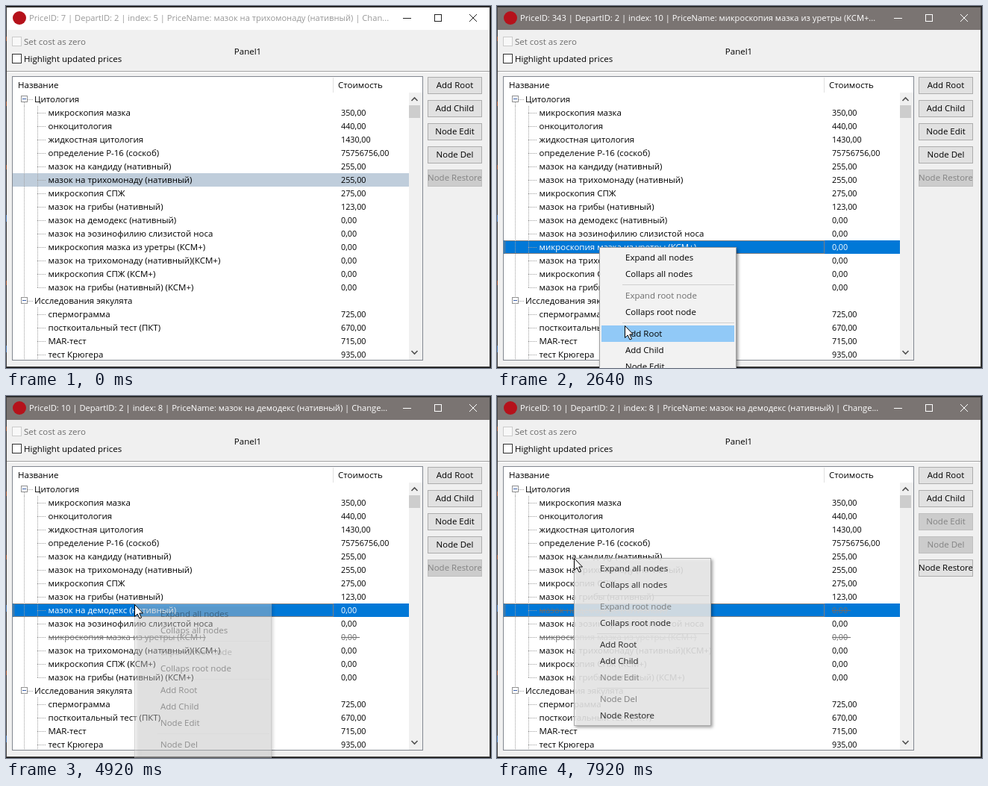
Write an HTML page with a canvas that moves like this. It is 650 by 485 pixels and loops after 8 s.

```html
<!DOCTYPE html>
<html lang="ru">
<head>
<meta charset="utf-8">
<title>Price tree</title>
<style>
html, body { margin: 0; width: 100%; height: 100%; overflow: hidden; background: #1e1e1e; }
canvas { display: block; }
</style>
</head>
<body>
<canvas id="stage" width="650" height="485"></canvas>
<script>
const ctx = document.getElementById('stage').getContext('2d');
const LOOP = 8000, STEP = 40, ROW = 18, TOP = 116;
const BLACK = '#000', GRAY = '#6d6d6d';
const BODY = 11.5, TITLE = 11.15, PRICE = 10.8;

const rows = `Цитология
микроскопия мазка|350,00
онкоцитология|440,00
жидкостная цитология|1430,00
определение Р-16 (соскоб)|75756756,00
мазок на кандиду (нативный)|255,00
мазок на трихомонаду (нативный)|255,00
микроскопия СПЖ|275,00
мазок на грибы (нативный)|123,00
мазок на демодекс (нативный)|0,00
мазок на эозинофилию слизистой носа|0,00
микроскопия мазка из уретры (КСМ+)|0,00
мазок на трихомонаду (нативный)(КСМ+)|0,00
микроскопия СПЖ (КСМ+)|0,00
мазок на грибы (нативный) (КСМ+)|0,00
Исследования эякулята
спермограмма|725,00
посткоитальный тест (ПКТ)|670,00
MAR-тест|715,00
тест Крюгера|935,00`.split('\n').map(line => line.split('|'));

const titles = {
  6: 'PriceID: 7 | DepartID: 2 | index: 5 | PriceName: мазок на трихомонаду (нативный) | Chan...',
  11: 'PriceID: 343 | DepartID: 2 | index: 10 | PriceName: микроскопия мазка из уретры (КСМ+...',
  9: 'PriceID: 10 | DepartID: 2 | index: 8 | PriceName: мазок на демодекс (нативный) | Change...'
};
const buttons = ['Add Root', 'Add Child', 'Node Edit', 'Node Del', 'Node Restore'];

// Menu entries with the vertical centre of each; unnamed ones are separators
const items = [
  ['Expand all nodes', 14], ['Collaps all nodes', 36], ['', 50],
  ['Expand root node', 65], ['Collaps root node', 87], ['', 101],
  ['Add Root', 116], ['Add Child', 138], ['Node Edit', 160], ['', 174],
  ['Node Del', 189], ['Node Restore', 211]
];
const menus = [
  { x: 137, y: 323, from: 1920, to: 3560, fade: 220, off: ['Expand root node', 'Node Restore'] },
  { x: 172, y: 278, from: 4840, to: 6360, fade: 220, off: ['Expand root node', 'Node Restore'] },
  { x: 103, y: 217, from: 7840, to: 8000, fade: 95, off: ['Expand root node', 'Node Edit', 'Node Del'] }
];

// Pointer path: time, x, y
const path = [
  [680, 98, 415], [1040, 148, 319], [1200, 148, 319], [1720, 138, 323], [2280, 138, 323],
  [2840, 190, 487], [2960, 190, 488], [3000, 200, 512], [3640, 200, 512], [3720, 215, 486],
  [4360, 172, 279], [5160, 172, 279], [5400, 230, 399], [5840, 248, 459], [6000, 248, 459],
  [6200, 252, 467], [6600, 252, 467], [7040, 101, 214], [7520, 101, 214], [7560, 103, 217], [8000, 103, 217]
];
const presses = [[1200, 1320], [1760, 1920], [4400, 4520], [4680, 4840], [6200, 6360], [7640, 7840]];
const arrow = new Path2D('M.5 .5V16.5L4.2 13L7 19L9.5 18L6.8 12H11.5Z');

const clamp = v => Math.max(0, Math.min(1, v));

function fill(color, x, y, w, h) {
  ctx.fillStyle = color;
  ctx.fillRect(x, y, w, h);
}

function frame(color, x, y, w, h, dash = []) {
  ctx.strokeStyle = color;
  ctx.lineWidth = 1;
  ctx.setLineDash(dash);
  ctx.strokeRect(x + .5, y + .5, w - 1, h - 1);
  ctx.setLineDash([]);
}

function box(x, y, w, h, bg, border) {
  fill(bg, x + 1, y + 1, w - 2, h - 2);
  frame(border, x, y, w, h);
}

function text(str, x, cy, color = BLACK, { align = 'left', size = BODY } = {}) {
  ctx.font = `${size}px "Open Sans", "Noto Sans", sans-serif`;
  ctx.textAlign = align;
  ctx.fillStyle = color;
  ctx.fillText(str, x, cy + 4);
}

function line(color, points, dash = [], width = 1) {
  ctx.strokeStyle = color;
  ctx.lineWidth = width;
  ctx.setLineDash(dash);
  ctx.beginPath();
  points.forEach(([x, y]) => ctx.lineTo(x, y));
  ctx.stroke();
  ctx.setLineDash([]);
}

function faded(alpha, draw) {
  ctx.save();
  ctx.globalAlpha = alpha;
  draw();
  ctx.restore();
}

function clipped(x, y, w, h, draw) {
  ctx.save();
  ctx.beginPath();
  ctx.rect(x, y, w, h);
  ctx.clip();
  draw();
  ctx.restore();
}

function pointer(t) {
  const i = path.findIndex(p => p[0] > t);
  if (i === 0) return null;
  const [a, b] = [path[i - 1], path[i]], k = (t - a[0]) / (b[0] - a[0]);
  return { x: Math.round(a[1] + (b[1] - a[1]) * k), y: Math.round(a[2] + (b[2] - a[2]) * k) };
}

function drawWindow(active, title) {
  fill('#1e1e1e', 0, 0, 650, 485);
  box(0, 1, 649, 483, '#f0f0f0', active ? '#454443' : '#3c3c3c');
  [41, 128, 213, 368].forEach(y => fill('#a0522d', 0, y, 1, 6));
  [280, 455].forEach(y => fill('#4a7ab5', 0, y, 1, 9));
  fill(active ? '#7a7472' : '#fff', 1, 2, 647, 30);
  ctx.fillStyle = '#b5121b';
  ctx.beginPath();
  ctx.arc(18, 16, 9, 0, 7);
  ctx.fill();
  text(title, 31, 16, active ? '#fff' : '#999', { size: TITLE });
  const c = active ? '#fff' : '#222';
  line(c, [[532, 16.5], [543, 16.5]]);
  frame(c, 574, 11, 10, 10);
  line(c, [[621, 11], [631, 21]]);
  line(c, [[631, 11], [621, 21]]);

  box(8, 41, 13, 13, '#f8f8f8', '#ccc');
  text('Set cost as zero', 24, 48, GRAY);
  box(8, 64, 13, 13, '#fff', '#333');
  text('Highlight updated prices', 24, 71);
  text('Panel1', 324, 61, BLACK, { align: 'center' });
  fill('#a0a0a0', 1, 87, 647, 1);
  fill('#fff', 1, 88, 647, 1);
}

function drawButtons(k) {
  buttons.forEach((label, i) => {
    const y = 95 + 31 * i;
    const on = i < 2 ? 1 : i < 4 ? 1 - k : k;
    box(565, y, 73, 23, '#ccc', '#bfbfbf');
    faded(on, () => box(565, y, 73, 23, '#e1e1e1', '#adadad'));
    clipped(566, y, 71, 23, () =>
      text(label, 601.5, y + 11, on > .4 ? BLACK : '#838383', { align: 'center' }));
  });
}

function drawRow([name, price], i, selected, active, struck) {
  const y = TOP + ROW * i, cy = y + 9, dots = [1, 1], tree = '#a0a0a0';
  if (selected) {
    fill(active ? '#0078d7' : '#bfcddb', 9, y, 531, ROW);
    if (active) frame('#ff8728', 10, y, 429, ROW, dots);
  }
  line(tree, [[24.5, i ? y : cy], [24.5, y + ROW]], dots);
  if (!price) {
    line(tree, [[29, cy + .5], [36, cy + .5]], dots);
    box(20, cy - 5, 9, 9, '#fff', '#919191');
    fill('#3c5fa8', 22, cy - 1, 5, 1);
    text(name, 38, cy);
    return;
  }
  const lastChild = rows[i + 1]?.length === 1;
  line(tree, [[42.5, y], [42.5, lastChild ? cy : y + ROW]], dots);
  line(tree, [[42, cy + .5], [54, cy + .5]], dots);
  const color = struck ? GRAY : selected && active ? '#fff' : BLACK;
  text(name, 56.5, cy, color);
  if (struck) {
    fill(color, 57, cy, ctx.measureText(name).width, 1);
    fill(color, 449, cy, 25, 1);
  }
  text(price, 449, cy, color, { size: PRICE });
}

function drawTree(selected, active, struck) {
  box(8, 94, 551, 381, '#fff', '#828790');
  text('Название', 16, 106);
  text('Стоимость', 445, 106);
  fill('#e0e0e0', 438, 96, 1, 20);
  clipped(9, 95, 549, 379, () => {
    rows.forEach((row, i) => drawRow(row, i, i === selected, active, struck.includes(i)));
    fill('#f0f0f0', 540, TOP, 18, 358);
    fill('#cdcdcd', 540, 133, 15, 17);
    line('#505050', [[543.5, 127], [547.5, 123], [551.5, 127]], [], 1.6);
    line('#505050', [[543.5, 462], [547.5, 466], [551.5, 462]], [], 1.6);
  });
}

function drawItem(menu, [label, dy], hot) {
  const y = menu.y + dy;
  if (!label) return fill('#d0d0d0', menu.x + 31, y, 150, 1);
  if (hot) fill('#91c9f7', menu.x + 3, y - 11, 178, 22);
  text(label, menu.x + 35, y, menu.off.includes(label) ? GRAY : BLACK);
}

function drawMenu(menu, t, p) {
  faded(clamp((t - menu.from) / menu.fade), () => {
    ctx.shadowColor = 'rgba(0,0,0,.45)';
    ctx.shadowBlur = 4;
    ctx.shadowOffsetX = ctx.shadowOffsetY = 2;
    fill('#f2f2f2', menu.x, menu.y, 184, 225);
    ctx.shadowColor = 'transparent';
    frame('#a0a0a0', menu.x, menu.y, 184, 225);
    items.forEach(item => {
      const inside = p.x > menu.x + 3 && Math.abs(p.y - menu.y - item[1]) <= 11;
      drawItem(menu, item, inside);
    });
  });
}

function drawPointer(t, { x, y }) {
  if (presses.some(([a, b]) => t >= a && t < b)) {
    ctx.fillStyle = 'rgba(255,255,0,.47)';
    ctx.beginPath();
    ctx.arc(x, y, 12, 0, 7);
    ctx.fill();
  }
  ctx.save();
  ctx.translate(x, y);
  ctx.fillStyle = '#fff';
  ctx.fill(arrow);
  ctx.strokeStyle = BLACK;
  ctx.lineWidth = 1;
  ctx.stroke(arrow);
  ctx.restore();
}

function draw(t) {
  const active = t >= 1200;
  const selected = t < 1240 ? 6 : t < 4440 ? 11 : 9;
  const struck = [];
  if (t >= 3560) struck.push(11);
  if (t >= 6400) struck.push(9);
  const rise = from => clamp((t - from) / 200);
  const restorable = rise(3600) - rise(4440) + rise(6400);
  const p = pointer(t);

  drawWindow(active, titles[selected]);
  drawTree(selected, active, struck);
  drawButtons(restorable);
  menus.filter(m => t >= m.from && t < m.to).forEach(m => drawMenu(m, t, p));
  // The chosen entry lingers after its menu has closed
  if (t >= 6360 && t < 6660) faded(1 - (t - 6360) / 300, () => drawItem(menus[1], items[10], true));
  if (p) drawPointer(t, p);
}

const start = performance.now();
function tick() {
  const t = (performance.now() - start) % LOOP;
  draw(Math.floor(t / STEP) * STEP);
  requestAnimationFrame(tick);
}
tick();
</script>
</body>
</html>
```
